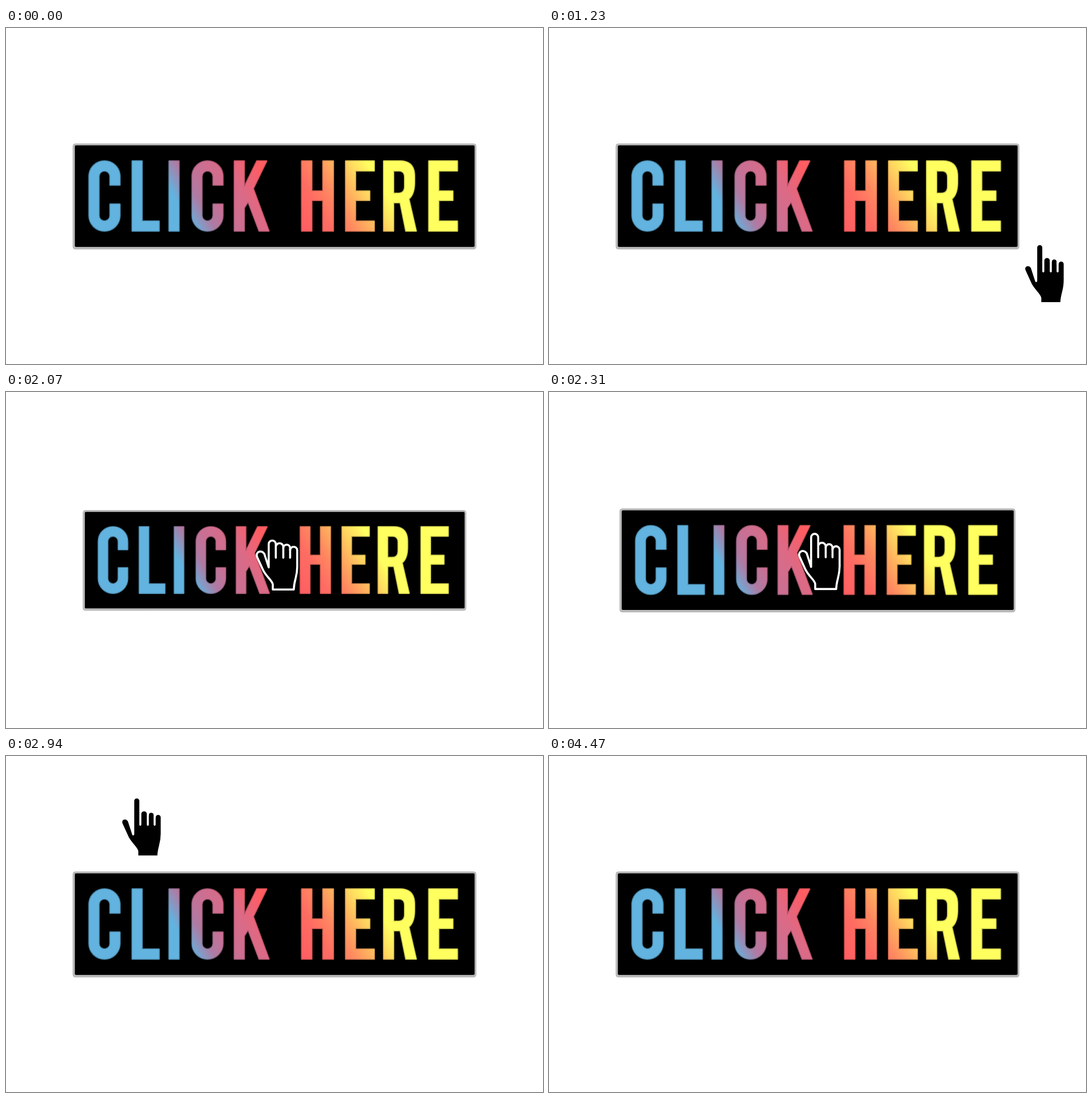
Write an HTML page that moves like this. It is 946x592 px and loops after 4.5 s.

```html
<!DOCTYPE html>
<html lang="en">
<head>
<meta charset="utf-8">
<title>Click here</title>
<style>
  html, body { margin: 0; width: 100%; height: 100%; overflow: hidden; background: #fff; }
  svg { display: block; width: 100%; height: 100%; }
  .frame { fill: #bcbcbc; stroke: #adadad; }
  .letters { fill: url(#rainbow); stroke: url(#rainbow); stroke-width: 3; stroke-opacity: .75; stroke-linejoin: round; fill-rule: evenodd; }
  .hand { stroke: #fff; stroke-width: 3.6; stroke-linejoin: round; stroke-linecap: round; }
</style>
</head>
<body>
<svg viewBox="0 0 946 592" role="img" aria-label="Click here">
  <defs>
    <linearGradient id="rainbow" gradientUnits="userSpaceOnUse" x1="298" y1="300" x2="575.2" y2="133.7">
      <stop offset="0" stop-color="#62b3df"/>
      <stop offset=".106" stop-color="#b07aa2"/>
      <stop offset=".19" stop-color="#c87094"/>
      <stop offset=".337" stop-color="#dc6a86"/>
      <stop offset=".483" stop-color="#ff5c62"/>
      <stop offset=".642" stop-color="#ff6c62"/>
      <stop offset=".735" stop-color="#ff8660"/>
      <stop offset=".828" stop-color="#ffb05e"/>
      <stop offset=".912" stop-color="#ffd860"/>
      <stop offset="1" stop-color="#ffff60"/>
    </linearGradient>
  </defs>

  <g id="button">
    <rect class="frame" x="118" y="204" width="710" height="185.5" rx="4"/>
    <rect x="121.3" y="206.8" width="704.2" height="179" rx="2"/>
    <path id="letters" class="letters"/>
  </g>

  <g id="cursor" class="hand" opacity="0">
    <path id="palm"/>
    <path d="M6.3 28V46M19.5 28V46M31.5 30V46" fill="none"/>
  </g>
</svg>

<script>
const LOOP = 4500, STEP = 30;
const byId = id => document.getElementById(id);
const button = byId('button'), cursor = byId('cursor'), palm = byId('palm');

// Letter outlines; the round stroke adds 1.5 px on every side.
const letterC = x => `M${x + 37} 276.5h17v-15a27 27 0 0 0 -54 0v69a27 27 0 0 0 54 0v-20h-17v20a10 10 0 0 1 -20 0v-69a10 10 0 0 1 20 0z`;
const letterE = x => `M${x} 234.5h50v17h-33v36h25v16h-25v37h33v17h-50z`;
byId('letters').setAttribute('d', [
  letterC(146.5),
  'M222.5 234.5h17v106h30v17h-47z',
  'M287.5 234.5h17v123h-17z',
  letterC(328),
  'M402.5 234.5h17v46l22.5-46h17L435.5 283 463 357.5H446L426.5 306 419.5 317v40.5h-17z',
  'M521 234.5h17.5v53h20v-53h18v123h-18v-54h-20v54H521z',
  letterE(598.5),
  'M665.5 234.5H694Q719.5 234.5 719.5 261V272Q719.5 293 709.5 301L722.5 357.5H704.5L694.5 307.5H682.5V357.5H665.5Z' +
    'M682.5 251.5H692Q702.5 251.5 702.5 263V279Q702.5 291.5 691 291.5H682.5Z',
  letterE(745)
].join(''));

const clamp = p => Math.min(1, Math.max(0, p));
const span = (t, from, to) => clamp((t - from) / (to - from));
const cubic = p => p < .5 ? 4 * p ** 3 : 1 - 4 * (1 - p) ** 3;
const sine = p => (1 - Math.cos(Math.PI * p)) / 2;
const curve = (u, a, b, c) => a.map((v, i) => (1 - u) ** 2 * v + 2 * u * (1 - u) * b[i] + u * u * c[i]);

// Silhouette with the index finger pulled in by `bend` pixels.
const handShape = bend =>
  `M-6.2 63V${4 + bend}A6.2 6.2 0 0 1 6.3 ${4 + bend}V27A6.6 6.5 0 0 1 19.5 27V29A6 6 0 0 1 31.5 29V33` +
  'A6.2 6.2 0 0 1 44 33V60C44.5 80 38.5 84 38 102H1V93C0 86 -10 80 -16 68L-26.5 45C-30 36 -20 31 -14 39Z';

const touch = [469, 246];

function draw(t) {
  const [x, y] = t < 2190
    ? curve(cubic(span(t, 810, 1890)), [757, 464], [1100, 272], touch)
    : curve(cubic(span(t, 2190, 3230)), touch, [384, 178], [199, 54]);
  const press = sine(span(t, 1890, 2070)) - sine(span(t, 2190, 2400));
  const scale = 1 - .05 * press;

  cursor.setAttribute('transform', `translate(${x} ${y})`);
  cursor.setAttribute('opacity', span(t, 780, 930) - span(t, 3240, 3450));
  palm.setAttribute('d', handShape(18 * press));
  button.setAttribute('transform', `translate(473 296.5) scale(${scale}) translate(-473 -296.5)`);
}

const start = performance.now();
function tick() {
  const t = (performance.now() - start) % LOOP;
  draw(t - t % STEP);
  requestAnimationFrame(tick);
}
tick();
</script>
</body>
</html>
```
